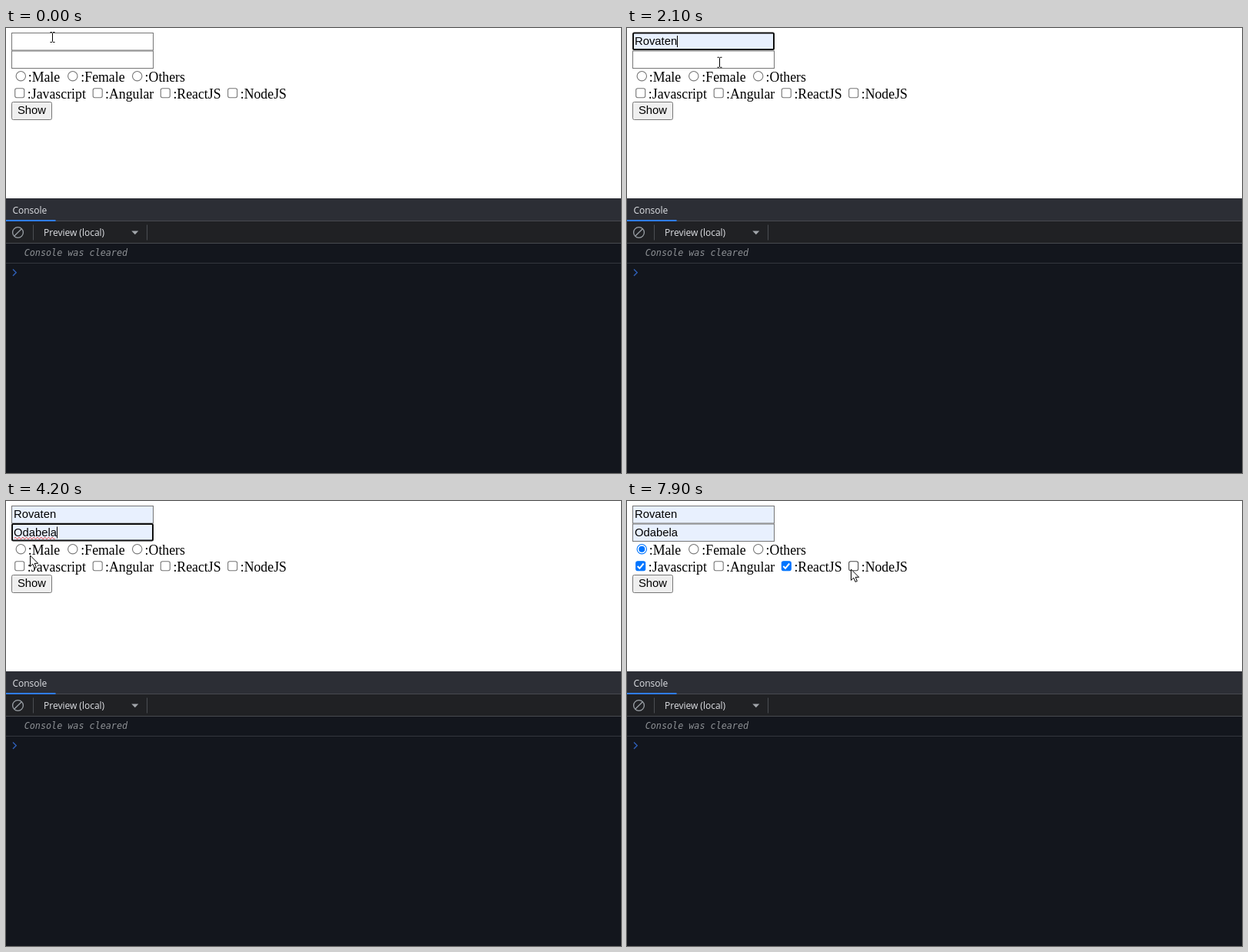
Recreate the animation shown at these times as an HTML page. Size 800 by 580 pixels, loop 8000 ms.

```html
<!DOCTYPE html>
<html lang="en">
<head>
<meta charset="utf-8">
<title>Form demo</title>
<style>
html, body { margin: 0; width: 100%; height: 100%; overflow: hidden; background: #fff; }
svg { display: block; width: 800px; height: 580px; }
text { white-space: pre; }
.label { font: 17.8px "Liberation Serif", "Times New Roman", serif; }
.field { font: 14.8px "Liberation Sans", Arial, sans-serif; }
.ui { font: 12px "Open Sans", "Noto Sans", sans-serif; fill: #dfe1e5; }
.log { font: italic 11.75px "DejaVu Sans Mono", monospace; fill: #8e9195; }
.offer { font: 600 12.9px "Open Sans", "Noto Sans", sans-serif; fill: #ececec; }
.ibeam { fill: none; stroke: #fff; mix-blend-mode: difference; }
</style>
</head>
<body>
<svg id="stage" viewBox="0 0 800 580"></svg>
<script>
const LOOP = 8000, STEP = 100;
const FIRST = "Rovaten", LAST = "Odabela";
const BLUE = "#0075ff", GREY = "#767676";

// Pointer path: time, x, y
const path = [
  [0, 60.5, 12], [500, 60.5, 12], [600, 60.5, 11], [800, 70, 13], [1300, 115, 50],
  [1500, 119, 56], [1800, 119, 56], [2200, 121, 41], [2300, 121, 41], [2800, 121, 97],
  [3000, 119, 94], [3200, 112, 92], [3400, 88.5, 90], [4000, 45, 80], [4400, 17, 61],
  [4700, 17, 62], [5000, 20, 85], [5100, 20, 86], [5500, 20, 86], [5800, 46, 86],
  [6700, 206, 85], [7100, 206, 85], [7600, 274, 85], [7900, 291, 88.5], [8000, 291, 88.5]
];

const within = (t, from, to) => t >= from && t < to;
const blink = (t, since) => (t - since) % 1000 <= 500;

function pointerAt(t) {
  const i = path.findIndex(p => p[0] > t);
  const [t0, x0, y0] = path[i - 1], [t1, x1, y1] = path[i];
  const k = (t - t0) / (t1 - t0);
  return [x0 + (x1 - x0) * k, y0 + (y1 - y0) * k];
}

const text = (cls, x, y, s) => `<text class="${cls}" x="${x}" y="${y}">${s}</text>`;
const rect = (x, y, w, h, fill, more = "") =>
  `<rect x="${x}" y="${y}" width="${w}" height="${h}" fill="${fill}" ${more}/>`;
const line = (d, stroke, width = 1) =>
  `<path d="${d}" fill="none" stroke="${stroke}" stroke-width="${width}"/>`;

function field(y, value, focused, caretX) {
  const fill = value ? "#e8f0fe" : "#fff";
  const box = focused
    ? rect(8, y + .5, 183, 21.5, fill, 'rx="1.5" stroke="#101010" stroke-width="2"')
    : rect(7.5, y + .5, 184, 22.5, fill, `stroke="${GREY}"`);
  const caret = caretX ? line(`M${caretX} ${y + 4}v15`, "#000") : "";
  return box + text("field", 10, y + 16, value) + caret;
}

function radio(x, label, labelX, on) {
  const ring = on ? BLUE : GREY;
  return `<circle cx="${x}" cy="62.7" r="6.2" fill="#fff" stroke="${ring}" stroke-width="1.1"/>` +
    (on ? `<circle cx="${x}" cy="62.7" r="4" fill="${BLUE}"/>` : "") +
    text("label", labelX, 70, ":" + label);
}

function checkbox(x, label, labelX, on, hover) {
  const edge = on ? BLUE : hover ? "#4a4a4a" : GREY;
  return rect(x - 6, 78.7, 12, 12, on ? BLUE : "#fff", `rx="2.2" stroke="${edge}" stroke-width="1.1"`) +
    (on ? line(`M${x - 4} 85l2.7 2.8l5.2 -6.3`, "#fff", 2) : "") +
    text("label", labelX, 92, ":" + label);
}

function popup(dy, name, hover) {
  return `<g transform="translate(0 ${dy})">` +
    '<path d="M90 41L99.5 31.5L109 41z" fill="#202020"/>' +
    rect(76, 39.5, 171, 49, "#202020", 'rx="6"') +
    (hover ? rect(79.5, 43, 164, 41, "#333", 'rx="3"') + line("M219.5 59.5l9 9m0 -9l-9 9", "#e4e4e4", 1.5) : "") +
    text("offer", 88.5, 68.8, name) + "</g>";
}

function squiggle(x, y, n) {
  return line(`M${x} ${y}` + "q1.2 -2.6 2.4 0t2.4 0".repeat(n), "#e03030", 1);
}

function pointer(t) {
  const [x, y] = pointerAt(t);
  const beam = t < 1100 || within(t, 2100, 3000);
  const shape = beam
    ? '<path class="ibeam" d="M-3 -6.5h2.2l.8 .8l.8 -.8h2.2M0 -5.5v11M-3 6.5h2.2l.8 -.8l.8 .8h2.2"/>'
    : '<path d="M.5 .5v14.3l3.3 -3.1l2.3 5.2l2.3 -1l-2.2 -5.1h4.5z" fill="#fff" stroke="#000"/>';
  return `<g style="mix-blend-mode:${beam ? "difference" : "normal"}" transform="translate(${x} ${y})">${shape}</g>`;
}

function form(t) {
  const focus1 = within(t, 600, 2200), focus2 = within(t, 2200, 4500);
  const caret1 = focus1 && blink(t, t < 1800 ? 600 : 1800) && (t < 1800 ? 11.5 : 65.5);
  const caret2 = focus2 && blink(t, t < 3200 ? 2300 : 3200) && (t < 3200 ? 11.5 : 66.5);
  const one = field(6, t >= 1400 ? FIRST : "", focus1, caret1);
  const two = field(29.5, t >= 3000 ? LAST : "", focus2, caret2);
  return (focus1 ? two + one : one + two) +
    (within(t, 3200, 4500) ? squiggle(11, 48.5, 11) : "") +
    radio(19.3, "Male", 28.7, t >= 4500) +
    radio(86.8, "Female", 97.3, false) +
    radio(170.7, "Others", 180.6, false) +
    checkbox(17.7, "Javascript", 27.8, t >= 5400, t >= 5000) +
    checkbox(119.2, "Angular", 129, false) +
    checkbox(207.3, "ReactJS", 217.4, t >= 7000) +
    checkbox(294.7, "NodeJS", 304.7, false, t >= 7800) +
    rect(7.5, 96.5, 52, 23, "#efefef", `rx="2" stroke="${GREY}"`) +
    text("field", 15, 112, "Show");
}

const panel =
  rect(0, 222, 800, 358, "#13161d") +
  rect(0, 222, 800, 30, "#2c2e35") +
  rect(0, 252, 800, 28, "#202124") +
  line("M0 251.5h800M0 280.5h800", "#474a4f") +
  line("M0 306.5h800", "#34373d") +
  rect(0, 250, 64.5, 2, "#2f7df6") +
  text("ui", 8.4, 242, "Console") +
  text("ui", 49, 270.7, "Preview (local)") +
  '<circle cx="15.5" cy="266.5" r="6.9" fill="none" stroke="#9aa0a6" stroke-width="1.3"/>' +
  line("M10.7 271.3l9.6 -9.6", "#9aa0a6", 1.3) +
  line("M35.5 256.5v20M183.5 256.5v20", "#4b4e53") +
  '<path d="M163.3 264.5h9l-4.5 4.7z" fill="#a2a6ab"/>' +
  text("log", 23.7, 297, "Console was cleared") +
  line("M9 314.5l4.2 4.2l-4.2 4.2", "#2f5fb8", 1.4);

function scene(t) {
  return rect(0, 0, 800, 580, "#fff") + form(t) + panel +
    (within(t, 800, 1800) ? popup(0, FIRST, t >= 1400) : "") +
    (within(t, 2300, 3200) ? popup(23, LAST, t >= 3000) : "") +
    pointer(t);
}

const stage = document.getElementById("stage");
const start = performance.now();
let shown = -1;

function tick() {
  const t = Math.floor((performance.now() - start) % LOOP / STEP) * STEP;
  if (t !== shown) stage.innerHTML = scene(shown = t);
  requestAnimationFrame(tick);
}
tick();
</script>
</body>
</html>
```
